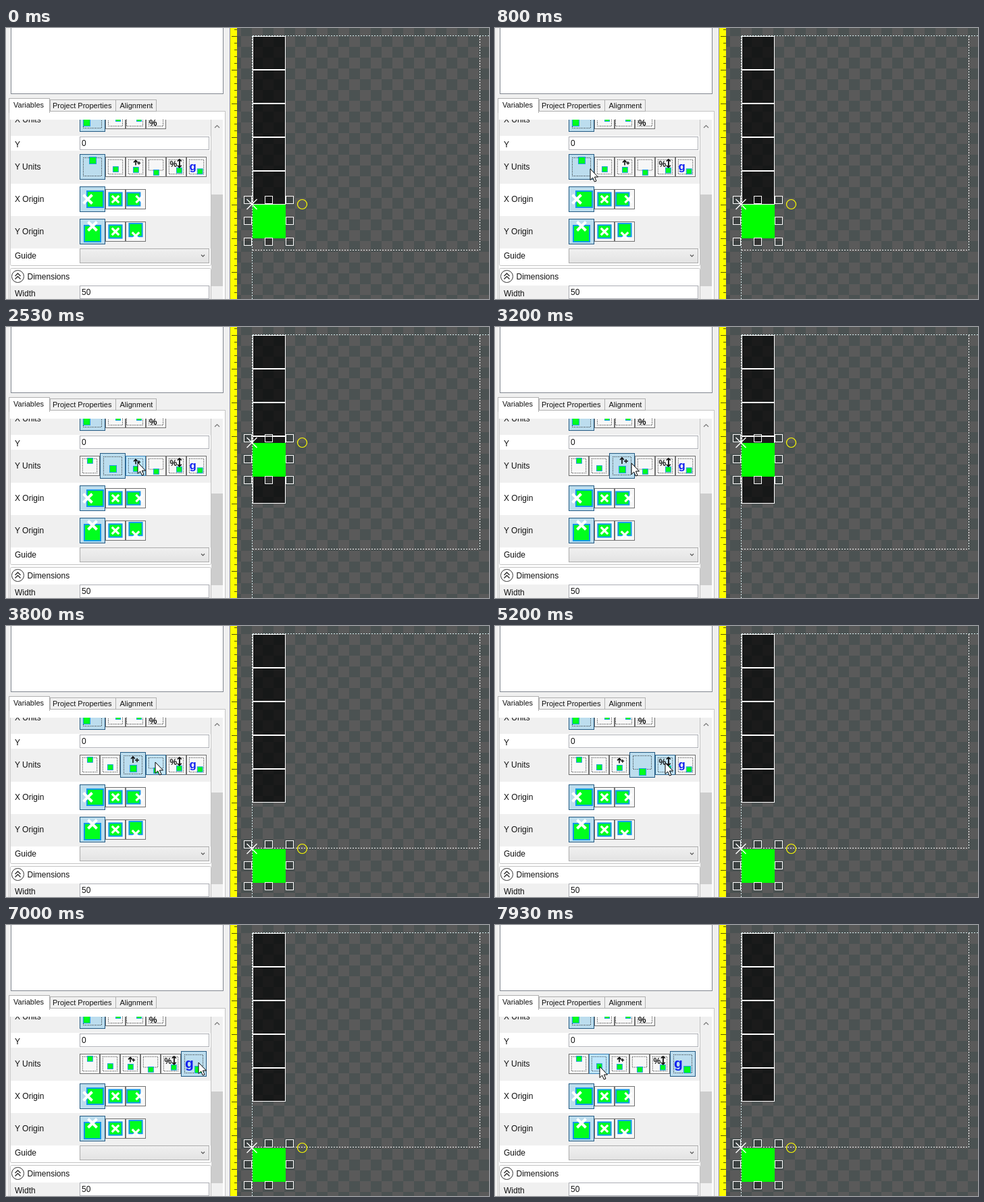
An HTML page for the animation above (8 s loop, 715x402 px).

```html
<!DOCTYPE html>
<html lang="en">
<head>
<meta charset="utf-8">
<title>Unit settings</title>
<style>
html, body { margin: 0; width: 100%; height: 100%; overflow: hidden; background: #f0f0f0; }
svg { display: block; width: 715px; height: 402px; }
text { font: 12px "Liberation Sans", Arial, sans-serif; fill: #111; }
.tab { font-size: 11px; }
.crisp { shape-rendering: crispEdges; }
</style>
</head>
<body>
<svg id="stage" viewBox="0 0 715 402" xmlns="http://www.w3.org/2000/svg"></svg>
<script>
const LOOP = 8000, TICK = 1000 / 15;

// Steps: [tick, value]
const SELECTED = [[0, 0], [27, 1], [43, 2], [58, 3], [80, 4], [105, 5]];
const PRESSED = [[0, -1], [25, 1], [27, -1], [41, 2], [43, -1], [56, 3], [58, -1], [78, 4], [80, -1], [103, 5], [105, -1]];
const HOVERED = [[0, -1], [14, 1], [27, -1], [36, 2], [43, -1], [49, 3], [58, -1], [73, 4], [80, -1], [91, 5], [105, -1], [119, 1]];
const BOX_TOP = [[0, 262], [26, 172], [57, 331], [80, 12], [105, 331]];
// Pointer: [tick, x, y], straight between neighbours
const POINTER = [
  [4, 17, 368], [6, 28, 354], [9, 78, 289], [12, 141, 209], [14, 163, 189], [16, 166, 195], [18, 167, 197],
  [34, 167, 197], [35, 164, 200], [36, 172, 201], [38, 195, 201], [40, 195, 201], [41, 196, 202],
  [46, 196, 202], [47, 192, 202], [49, 211, 201], [51, 221, 202], [61, 221, 202], [62, 252, 203],
  [87, 252, 203], [88, 256, 204], [90, 271, 204], [94, 285, 204], [116, 285, 204],
  [117, 254, 207], [118, 192, 210], [119, 155, 210]
];

const rect = (x, y, w, h, fill, extra = "") =>
  `<rect x="${x}" y="${y}" width="${w}" height="${h}" fill="${fill}" ${extra}/>`;
const frame = (x, y, w, h, fill, stroke, extra = "") =>
  rect(x + .5, y + .5, w - 1, h - 1, fill, `stroke="${stroke}" ${extra}`);
const path = (d, stroke, width = 1, extra = "") =>
  `<path d="${d}" fill="none" stroke="${stroke}" stroke-width="${width}" ${extra}/>`;
const label = (x, y, s, extra = "") => `<text x="${x}" y="${y}" ${extra}>${s}</text>`;
const crisp = s => `<g class="crisp">${s}</g>`;

const green = (x, y, s) => frame(x, y, s, s, "#00ff1e", "#1b9be0");
const dotted = (x, y, w, h) => frame(x, y, w, h, "none", "#222", 'stroke-dasharray="1 1.5"');
const upArrow = (x, y, h) => path(`M${x} ${y + h}V${y}M${x - 3} ${y + 3}L${x} ${y}L${x + 3} ${y + 3}`, "#111", 1.6);
const downArrow = (x, y, h) => path(`M${x} ${y}V${y + h}M${x - 3} ${y + h - 3}L${x} ${y + h}L${x + 3} ${y + h - 3}`, "#111", 1.6);
const percent = (x, y, size) => label(x, y, "%", `style="font-size:${size}px;font-weight:bold"`);

// Icons are drawn around 0,0; k is 1 for a large button
const yIcons = [
  k => dotted(-14 * k, -14 * k, 28 * k, 28 * k) + green(-5 * k, -15 * k, 11 * k),
  k => dotted(-14 * k, -14 * k, 28 * k, 28 * k) + green(-5 * k, -1 * k, 11 * k),
  k => dotted(-14 * k, -14 * k, 28 * k, 28 * k) + green(-5 * k, 0, 11 * k) + upArrow(0, -12 * k, 9 * k) +
       path(`M${3 * k} ${-7 * k}h${6 * k}M${6 * k} ${-10 * k}v${6 * k}`, "#111", 1.4),
  k => dotted(-14 * k, -14 * k, 28 * k, 21 * k) + green(-5 * k, 5 * k, 11 * k),
  k => dotted(-14 * k, -14 * k, 28 * k, 28 * k) + green(0, 1 * k, 11 * k) + percent(-12 * k, 0, 15 * k) +
       upArrow(6 * k, -14 * k, 14 * k) + downArrow(6 * k, -12 * k, 13 * k),
  k => dotted(-14 * k, -14 * k, 28 * k, 28 * k) + green(1 * k, 3 * k, 11 * k) +
       label(-13 * k, 6 * k, "g", `style="font-size:${21 * k}px;font-weight:bold;fill:#1422f0"`)
];
const xIcons = [
  k => dotted(-14, -14, 28, 28) + green(-14, 0, 11),
  k => dotted(-11, -11, 22, 22) + green(0, -4, 8),
  k => dotted(-14, -11, 25, 22) + green(1, -4, 8),
  k => dotted(-11, -11, 22, 22) + percent(-10, 10, 13) + green(2, -6, 7)
];
const originIcon = (dx, dy) => k => {
  const s = 24 * k, cross = 6.5 * k, gx = -s / 2 - dx * 4 * k, gy = -s / 2 - dy * 3 * k;
  const cx = dx * 7 * k, cy = dy * 8 * k;
  return rect(gx, gy, s, s, "#00ff1e", 'stroke="#1299e6" stroke-width="2"') +
    path(`M${cx - cross} ${cy - cross}l${2 * cross} ${2 * cross}m0 ${-2 * cross}l${-2 * cross} ${2 * cross}`, "#fff", 4 * k);
};

function buttons(icons, cy, sel, hover = -1, press = -1) {
  let x = 109, out = "";
  icons.forEach((icon, i) => {
    const on = i === sel, size = on ? 38 : 30;
    const [fill, line] = on ? ["#bcddee", "#245a83"] : i === press ? ["#c4e5f6", "#2c628b"] :
      i === hover ? ["#bee6fd", "#3c7fb1"] : ["#f7f7f7", "#707070"];
    out += crisp(frame(x, cy - size / 2, size, size, fill, line)) +
      `<g transform="translate(${x + size / 2} ${cy})">${icon(on ? 1 : .8)}</g>`;
    x += size;
  });
  return out;
}

function panel() {
  const rows = [[136, 24, "#f0f0f0"], [160, 22, "#fff"], [182, 49, "#f0f0f0"], [231, 48, "#fff"], [279, 48, "#f0f0f0"], [327, 25, "#fff"]];
  const field = (y, s) => crisp(frame(109, y, 192, 20, "#fff", "#abadb3")) + label(112, y + 14, s);
  return rect(0, 0, 332, 402, "#f0f0f0") +
    crisp(
      frame(7, -2, 315, 100, "#fff", "#828790") +
      frame(4, 123, 321, 290, "#fff", "#c4c4c4") +
      frame(65, 106, 98, 18, "#f0f0f0", "#b0b0b0") +
      frame(162, 106, 61, 18, "#f0f0f0", "#b0b0b0") +
      frame(4, 104, 61, 22, "#fff", "#b0b0b0") + rect(5, 123, 59, 4, "#fff") +
      rows.map(([y, h, c]) => rect(7, y, 296, h, c)).join("") +
      rect(7, 382, 296, 20, "#f0f0f0") +
      rect(304, 136, 17, 266, "#f0f0f0") + rect(304, 247, 17, 136, "#cdcdcd")
    ) +
    path("M6.5 136V350.500Q6.500 352.500 8.500 352.500H301.500Q303.500 352.500 303.500 350.500V136", "#c2c2c2") +
    path("M6.500 402V358.500Q6.500 356.500 8.500 356.500H301.500Q303.500 356.500 303.500 358.500V402", "#c2c2c2") +
    path("M309 148l3.500 -3.500l3.500 3.500", "#777", 1.2) +
    label(11, 118, "Variables", 'class="tab"') +
    label(69, 119, "Project Properties", 'class="tab"') +
    label(168.500, 119, "Alignment", 'class="tab"') +
    `<g clip-path="url(#view)">${label(13, 140, "X Units")}${buttons(xIcons, 135, 0)}</g>` +
    label(13, 177, "Y") + field(161, "0") +
    label(13, 210, "Y Units") + label(13, 258, "X Origin") + label(13, 306, "Y Origin") +
    buttons([originIcon(-1, 0), originIcon(0, 0), originIcon(1, 0)], 254, 0) +
    buttons([originIcon(0, -1), originIcon(0, 0), originIcon(0, 1)], 302, 0) +
    label(13, 342, "Guide") +
    crisp(frame(109, 327, 192, 22, "url(#combo)", "#acacac")) +
    path("M289 336.500l2.500 2.500l2.500 -2.500", "#555", 1.2) +
    `<circle id="knob" cx="17.500" cy="368.500" r="9" fill="#fff" stroke="#333"/>` +
    path("M13.500 368l4 -4l4 4M13.500 372.500l4 -4l4 4", "#333", 1.5) +
    label(31.500, 373, "Dimensions") + label(13, 398, "Width") + field(382, "50");
}

function editor() {
  let ticks = "", items = "";
  for (let i = -1; i < 40; i++) ticks += rect(i % 5 ? 338 : 334, 12 + i * 10, i % 5 ? 4 : 8, 1, "#555500");
  for (let i = 0; i < 5; i++) items += frame(365, 12 + i * 50, 49, 50, "rgba(0,0,0,.7)", "#fff");
  const dash = 'stroke-dasharray="2 2"';
  return crisp(
    rect(331, 0, 1, 402, "#8c8c8c") + rect(332, 0, 10, 402, "#ff0") + ticks +
    rect(342, 0, 373, 402, "url(#check)") +
    path("M364.500 11.500V402M364.500 11.500H715", "#d8eef0", 1, dash) +
    path("M701.500 12V329.500H365", "#fff", 1, dash) + items
  );
}

function selection() {
  let out = crisp(rect(365, 0, 49, 50, "#0f0"));
  for (const x of [358, 389, 420]) for (const y of [-7, 24, 55]) {
    if (x === 389 && y === 24) continue;
    out += crisp(frame(x - 6, y - 6, 12, 12, y === 55 && x === 389 ? "#333" : "rgba(0,0,0,.2)", "#fff"));
  }
  return out + path("M356.500 -8l15 15m0 -15l-15 15", "#fff", 1.4) +
    `<circle cx="438.500" cy="-.500" r="7" fill="none" stroke="#ff0" stroke-width="1.200"/>`;
}

const stage = document.getElementById("stage");
stage.innerHTML = `<defs>
  <pattern id="check" x="364" y="12" width="32" height="32" patternUnits="userSpaceOnUse">
    ${rect(0, 0, 32, 32, "#5a5a5a")}${rect(0, 0, 16, 16, "#4b5252")}${rect(16, 16, 16, 16, "#4b5252")}
  </pattern>
  <linearGradient id="combo" x2="0" y2="1"><stop stop-color="#f0f0f0"/><stop offset="1" stop-color="#e3e3e3"/></linearGradient>
  <clipPath id="view"><rect x="6" y="136" width="298" height="266"/></clipPath>
  </defs>${panel()}<g id="units"></g>${editor()}<g id="box">${selection()}</g>
  <path id="pointer" d="M0 0V16.500L3.700 13L6.300 19L9 18L6.400 12H11.500Z" fill="#fff" stroke="#000"/>`;

const [units, box, pointer, knob] = ["units", "box", "pointer", "knob"].map(id => document.getElementById(id));
const step = (list, n) => list.filter(s => s[0] <= n).pop()[1];

function pointerAt(n) {
  const i = POINTER.findIndex(p => p[0] > n);
  if (i < 0) return POINTER[POINTER.length - 1].slice(1);
  const [a, ax, ay] = POINTER[i - 1], [b, bx, by] = POINTER[i], k = (n - a) / (b - a);
  return [Math.round(ax + (bx - ax) * k), Math.round(ay + (by - ay) * k)];
}

let shown = -1;
function draw(n) {
  if (n === shown) return;
  shown = n;
  units.innerHTML = buttons(yIcons, 206, step(SELECTED, n), step(HOVERED, n), step(PRESSED, n));
  box.setAttribute("transform", `translate(0 ${step(BOX_TOP, n)})`);
  const visible = n >= POINTER[0][0];
  pointer.style.display = visible ? "" : "none";
  if (visible) pointer.setAttribute("transform", `translate(${pointerAt(n)})`);
  knob.setAttribute("fill", n === 4 || n === 5 ? "#e5f3fd" : "#fff");
}

const start = performance.now();
function loop() {
  const t = (performance.now() - start) % LOOP;
  draw(Math.floor((t + 4) / TICK) % 120);
  requestAnimationFrame(loop);
}
loop();
</script>
</body>
</html>
```
